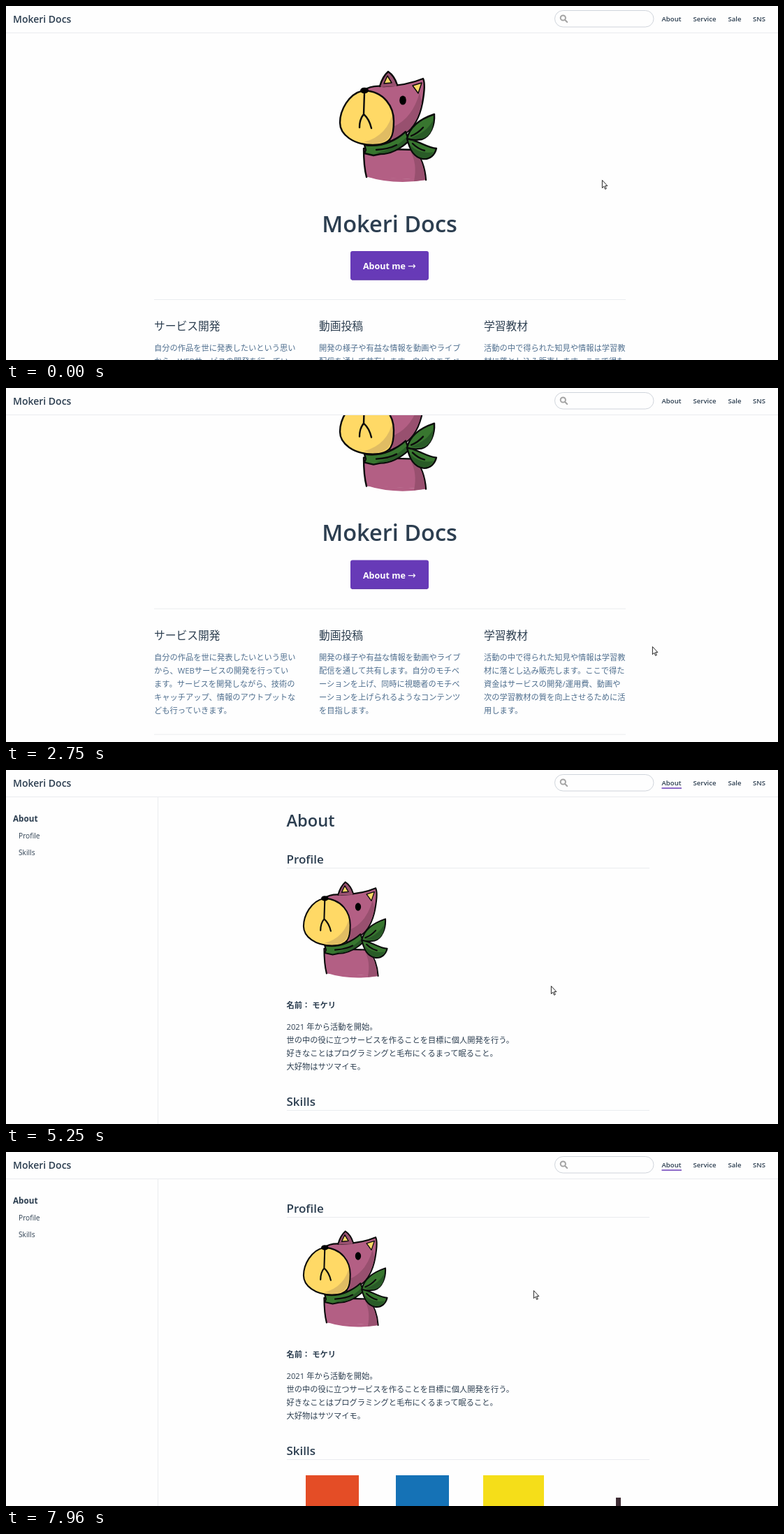
These frames come from a looping animation (1105x507 px, 8000 ms). An HTML page:

```html
<!DOCTYPE html>
<html lang="ja">
<head>
<meta charset="utf-8">
<title>Mokeri Docs</title>
<style>
html, body { margin: 0; width: 100%; height: 100%; overflow: hidden; background: #fefefe; }
svg { display: block; width: 100%; height: 100%; }
text { font-family: "Open Sans", "Noto Sans", "Noto Sans CJK JP", "Noto Sans CJK", sans-serif; fill: #2c3e50; white-space: pre; }
.semi { font-weight: 600; }
.bold { font-weight: 700; }
.thin { font-weight: 300; }
.soft { fill: #4e6e8e; }
.mid { text-anchor: middle; }
.rule { stroke: #eaecef; }
.ink { stroke: #0b0b0b; stroke-width: 2.4; stroke-linecap: round; stroke-linejoin: round; }
.line { fill: none; }
.pink { fill: #b35f84; }
.plum { fill: #98506f; }
.yellow { fill: #ffd966; }
.green { fill: #38762f; }
.forest { fill: #295b27; }
</style>
</head>
<body>
<svg viewBox="0 0 1105 507" xmlns="http://www.w3.org/2000/svg">
  <defs>
    <g id="mascot">
      <path class="pink" d="M515 244Q556 257 602 249Z"/>
      <path class="pink ink" d="M601 249Q599 222 585 206L512 204Q512 230 516 245"/>
      <path class="plum" d="M579 208Q589 226 584 251L600 249Q598 222 585 207Z"/>
      <path class="pink ink" d="M512 121Q522 113 541 115Q573 114 597 104Q601 112 596 139Q590 170 571 183L550 194Z"/>
      <path class="plum" d="M592 124Q582 160 556 172L553 191L571 182Q589 170 595 139Z"/>
      <path class="plum ink" d="M535 115Q539 101 547 94Q556 100 560 113"/>
      <path class="plum" d="M536 114L559 112V115L537 116Z"/>
      <path class="yellow ink" style="stroke-width:1.5" d="M541 111L546 100L552 110ZM582 114L595 110L590 125Z"/>
      <path class="yellow" d="M512 121C490 125 478 150 478 167S497 199 525 199S555 185 555 165S542 122 512 121Z"/>
      <path fill="#e0bc63" d="M554 150Q547 186 512 195Q553 206 555 165Z"/>
      <path class="line ink" d="M512 121C490 125 478 150 478 167S497 199 525 199S555 185 555 165S542 122 512 121ZM513 124L512 155Q506 162 506 174M512 155Q520 162 523 175"/>
      <ellipse cx="513" cy="121" rx="6" ry="4.3"/>
      <ellipse cx="568" cy="135" rx="4.8" ry="6.6"/>
      <path class="green ink" d="M513 199Q545 204 572 180L577 193Q556 212 536 212L526 214L513 211L515 206Z"/>
      <path class="forest" d="M530 210Q556 206 574 187L575 193Q556 211 536 211Z"/>
      <path class="green ink" d="M574 190C578 172 595 161 613 155C614 170 608 187 595 191Q584 193 574 190C589 192 602 203 616 204C614 213 607 220 597 219C584 217 578 206 574 190Z"/>
      <path class="forest" d="M579 189Q604 180 612 162Q611 187 595 190ZM578 199Q592 213 612 209Q606 219 597 218Q583 215 578 199Z"/>
      <path class="line ink" d="M530 206Q548 205 559 199M580 186Q590 182 597 174M582 197Q590 205 599 207"/>
    </g>
  </defs>
  <rect width="1105" height="507" fill="#fefefe"/>
  <g id="home">
    <use href="#mascot"/>
    <text class="semi mid" x="549" y="323.5" font-size="32.5">Mokeri Docs</text>
    <rect id="button" x="493" y="351" width="112" height="41.5" rx="3"/>
    <path d="M495 392H603" stroke="#5d34a5"/>
    <text class="bold" x="511" y="377" font-size="12.5" style="fill:#fff">About me</text>
    <text x="575" y="377" font-size="14" style="fill:#fff;font-family:'DejaVu Sans',sans-serif">→</text>
    <path class="rule" d="M212 420.5H887M212 600.5H887"/>
    <g id="features"></g>
    <text class="soft mid" x="549" y="640.5" font-size="10.8">© 2021 mokeri</text>
  </g>
  <g id="about">
    <g id="article">
      <text class="semi" x="401.5" y="80.5" font-size="23.6">About</text>
      <text id="hash" class="semi" x="387.5" y="133.5" font-size="17" style="fill:#673ab7">#</text>
      <text class="semi" x="401.5" y="133.5" font-size="17">Profile</text>
      <path class="rule" d="M402 140.5H921M402 487.5H921"/>
      <use href="#mascot" transform="translate(11.5 79) scale(.867)"/>
      <g id="bio"></g>
      <text class="semi" x="401.5" y="480.5" font-size="17">Skills</text>
      <rect x="429" y="510" width="76" height="76" fill="#e44d26"/>
      <rect x="558" y="510" width="76" height="76" fill="#1572b6"/>
      <rect x="683" y="510" width="87" height="87" fill="#f5de19"/>
      <rect x="873" y="542" width="7" height="50" fill="#3f2d35"/>
    </g>
    <path class="rule" d="M217.5 38V507"/>
    <text class="bold" x="10" y="74" font-size="11.7">About</text>
    <text x="18" y="98" font-size="10.2">Profile</text>
    <text x="18" y="121.5" font-size="10.2">Skills</text>
  </g>
  <rect width="1105" height="38" fill="#fefefe"/>
  <path class="rule" d="M0 38.5H1105"/>
  <text class="semi" x="10" y="23.5" font-size="14">Mokeri Docs</text>
  <rect x="785.5" y="6.5" width="141.5" height="23.5" rx="11.75" fill="#fefefe" stroke="#cfd4db"/>
  <g fill="none" stroke="#a3a3a3" stroke-width="2" stroke-linecap="round">
    <circle cx="797.3" cy="17" r="3.6"/>
    <path d="M800.2 20L803.2 23"/>
  </g>
  <g class="semi" font-size="9.6">
    <text x="938.5" y="22">About</text>
    <text x="983.5" y="22">Service</text>
    <text x="1033.5" y="22">Sale</text>
    <text x="1069" y="22">SNS</text>
  </g>
  <path id="active" d="M938.5 26H967" stroke="#7a52c0" stroke-width="1.7"/>
  <g id="cursor" stroke="#111" stroke-width=".9" fill="#fff" stroke-linejoin="round">
    <path id="arrow" d="M.4 .5V11.6L2.9 9.2L4.6 13.3L6.3 12.6L4.6 8.6H7.9Z"/>
    <path id="hand" d="M-1 1Q.3 -.8 1.4 1V5.5L7 7Q8 8 7.5 11L6 15.5H0L-4.6 9.5Q-4.6 7.4 -2.8 8.3L-1 10Z"/>
  </g>
</svg>
<script>
const $ = id => document.getElementById(id);
const LOOP = 8000, CLICK = 4560;
const EM = 11.25, LINE = 19;

function addText(parent, x, y, str, cls, size = EM) {
  const el = document.createElementNS("http://www.w3.org/2000/svg", "text");
  const attrs = { x, y, class: cls, "font-size": size };
  for (const name in attrs) el.setAttribute(name, attrs[name]);
  el.textContent = str;
  $(parent).append(el);
}

const addLines = (parent, x, y, lines, cls) =>
  lines.forEach((line, i) => addText(parent, x, y + i * LINE, line, cls));

const features = [
  ["サービス開発", "自分の作品を世に発表したいという思い", "から、WEBサービスの開発を行ってい", "ます。サービスを開発しながら、技術の", "キャッチアップ、情報のアウトプットな", "ども行っていきます。"],
  ["動画投稿", "開発の様子や有益な情報を動画やライブ", "配信を通して共有します。自分のモチベ", "ーションを上げ、同時に視聴者のモチベ", "ーションを上げられるようなコンテンツ", "を目指します。"],
  ["学習教材", "活動の中で得られた知見や情報は学習教", "材に落とし込み販売します。ここで得た", "資金はサービスの開発/運用費、動画や", "次の学習教材の質を向上させるために活", "用します。"]
];
features.forEach(([head, ...lines], col) => {
  const x = 212 + col * 236;
  addText("features", x, 464, head, "thin", EM * 1.4);
  addLines("features", x, 494, lines, "soft");
});

addText("bio", 401.5, 341, "名前： モケリ", "bold");
addLines("bio", 401.5, 371.5, [
  "2021 年から活動を開始。",
  "世の中の役に立つサービスを作ることを目標に個人開発を行う。",
  "好きなことはプログラミングと毛布にくるまって眠ること。",
  "大好物はサツマイモ。"
], "");

// Smooth progress from 0 to 1 between two times
function ease(t, from, to) {
  const p = Math.min(1, Math.max(0, (t - from) / (to - from)));
  return p * p * (3 - 2 * p);
}

// Pointer glides: from, to, end position
const glides = [
  [40, 310, 696, 170],
  [480, 880, 920, 188],
  [1350, 1660, 932, 260],
  [1780, 2370, 925, 370],
  [3450, 4240, 572, 372],
  [CLICK, 5250, 780, 309],
  [5250, 5870, 786, 282],
  [5940, 6870, 992, 26],
  [6940, 7480, 949, 41],
  [7480, 7880, 755, 198]
];

function pointerAt(t) {
  let x = 853, y = 249;
  for (const [from, to, endX, endY] of glides) {
    const p = ease(t, from, to);
    x += (endX - x) * p;
    y += (endY - y) * p;
  }
  return [x, y];
}

const show = (id, on) => $(id).setAttribute("display", on ? "inline" : "none");
const move = (id, x, y) => $(id).setAttribute("transform", `translate(${x.toFixed(2)} ${y.toFixed(2)})`);

function draw(t) {
  const [x, y] = pointerAt(t);
  const about = t >= CLICK;
  const over = !about && x > 493 && x < 605 && y > 351 && y < 393;
  show("home", !about);
  show("about", about);
  show("active", about);
  show("hash", x < 921 && y > 65 && y < 141);
  show("hand", over);
  show("arrow", !over);
  $("button").setAttribute("fill", over ? "#7f56c8" : "#673ab7");
  move("home", 0, -142 * (ease(t, 700, 1082) - ease(t, 2670, 2910)));
  move("article", 0, -47 * ease(t, 7800, 7960));
  move("cursor", x, y);
}

function tick(now) {
  draw(now % LOOP);
  requestAnimationFrame(tick);
}
draw(0);
requestAnimationFrame(tick);
</script>
</body>
</html>
```
